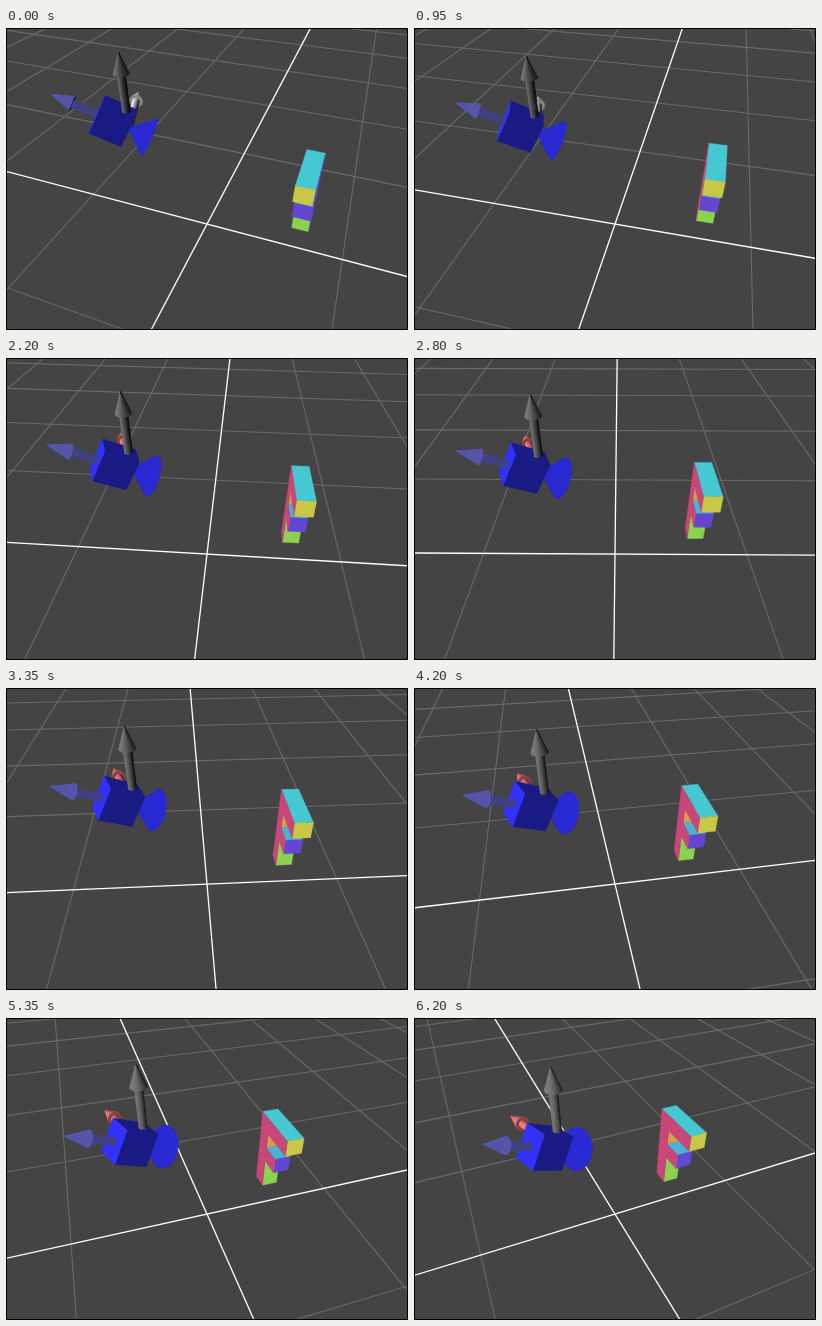
These frames come from a looping animation (402x302 px, 6250 ms). An HTML page with a canvas:

```html
<!DOCTYPE html>
<html>
<head>
<meta charset="utf-8">
<style>
  html, body { margin: 0; width: 100%; height: 100%; overflow: hidden; background: #000; }
  canvas { display: block; }
</style>
</head>
<body>
<canvas id="stage" width="402" height="302"></canvas>
<script>
const ctx = document.getElementById('stage').getContext('2d');
const LOOP = 6250, STEP = 50;
const rad = deg => deg * Math.PI / 180;

// small vector helpers
const add = (a, b, s = 1) => a.map((v, i) => v + b[i] * s);
const dot = (a, b) => a[0] * b[0] + a[1] * b[1] + a[2] * b[2];
const unit = a => { const n = Math.hypot(...a); return a.map(v => v / n); };
const cross = (a, b) => [
  a[1] * b[2] - a[2] * b[1],
  a[2] * b[0] - a[0] * b[2],
  a[0] * b[1] - a[1] * b[0]
];

// orbiting viewer: one unit is one grid cell, angle is set per frame
const FOCAL = 412, CENTER = [201, 151];
const SIN_P = Math.sin(rad(38.2)), COS_P = Math.cos(rad(38.2));
const EYE_DIST = 2.246, EYE_HEIGHT = 2.203;
let sinA, cosA, eye;

function setView(angle) {
  sinA = Math.sin(angle);
  cosA = Math.cos(angle);
  eye = [-EYE_DIST * sinA, EYE_HEIGHT, EYE_DIST * cosA];
}

function toView([x, y, z]) {
  const right = x * cosA + z * sinA;
  const ahead = x * sinA - z * cosA + EYE_DIST;
  const rise = y - EYE_HEIGHT;
  return [right, ahead * SIN_P + rise * COS_P, ahead * COS_P - rise * SIN_P];
}

const toScreen = ([x, y, z]) => [CENTER[0] + FOCAL * x / z, CENTER[1] - FOCAL * y / z];

// ground grid
const GRID = 10, NEAR = 0.2;

function line(from, to, color, width) {
  let a = toView(from), b = toView(to);
  if (a[2] < NEAR && b[2] < NEAR) return;
  const cut = (p, q) => add(p, add(q, p, -1), (NEAR - p[2]) / (q[2] - p[2]));
  if (a[2] < NEAR) a = cut(a, b);
  else if (b[2] < NEAR) b = cut(b, a);
  ctx.strokeStyle = color;
  ctx.lineWidth = width;
  ctx.beginPath();
  ctx.moveTo(...toScreen(a));
  ctx.lineTo(...toScreen(b));
  ctx.stroke();
}

function drawGrid() {
  const pair = (i, color, width) => {
    line([i, 0, -GRID], [i, 0, GRID], color, width);
    line([-GRID, 0, i], [GRID, 0, i], color, width);
  };
  for (let i = -GRID; i <= GRID; i++) if (i) pair(i, '#696969', 1.1);
  pair(0, '#fff', 1.3);
}

// flat faces, skipped when turned away from the viewer
function face(points, normal, color) {
  if (dot(normal, add(eye, points[0], -1)) <= 0) return;
  ctx.fillStyle = ctx.strokeStyle = `rgb(${color.map(Math.round)})`;
  ctx.lineWidth = 0.4;
  ctx.beginPath();
  points.forEach(p => ctx.lineTo(...toScreen(toView(p))));
  ctx.closePath();
  ctx.fill();
  ctx.stroke();
}

// letter F, standing with its arms along z
const F = { x: 0.6, y: -0.116, z: -0.44, unit: 0.0044, depth: 30 };
const fPoint = (u, v, d) => [F.x + d * F.unit, F.y + v * F.unit, F.z + u * F.unit];

function drawLetter() {
  const D = F.depth;
  const end = (u, v0, v1, color) => face(
    [fPoint(u, v0, 0), fPoint(u, v0, D), fPoint(u, v1, D), fPoint(u, v1, 0)], [0, 0, 1], color);
  const top = (v, u0, u1, color) => face(
    [fPoint(u0, v, 0), fPoint(u0, v, D), fPoint(u1, v, D), fPoint(u1, v, 0)], [0, 1, 0], color);
  const outline = [[0, 0], [30, 0], [30, 60], [67, 60], [67, 90],
    [30, 90], [30, 120], [100, 120], [100, 150], [0, 150]];
  end(30, 0, 60, [140, 210, 80]);
  end(30, 90, 120, [210, 160, 70]);
  top(90, 30, 67, [70, 180, 210]);
  end(67, 60, 90, [100, 70, 210]);
  top(150, 0, 100, [70, 200, 210]);
  end(100, 120, 150, [200, 200, 70]);
  face(outline.map(([u, v]) => fPoint(u, v, 0)), [-1, 0, 0], [200, 70, 120]);
  face(outline.map(([u, v]) => fPoint(u, v, D)), [1, 0, 0], [80, 70, 200]);
}

// camera model and its axes
const ORIGIN = [-0.434, 0.877, 0.219];
const Z_AXIS = unit(add(ORIGIN, [0.665, 0.235, -0.2], -1));
const X_AXIS = unit(cross([0, 1, 0], Z_AXIS));
const Y_AXIS = cross(Z_AXIS, X_AXIS);
const UP = [0, 1, 0], SIDE = X_AXIS.map(v => -v);
const BODY = { x: 0.075, y: 0.1, z: 0.205 };
const LENS = { radius: 0.127, length: 0.136 };
const ARROW = { length: 0.481, head: 0.125, headRadius: 0.045, radius: 0.022 };
const SEGMENTS = 24;

const shade = (color, normal) => color.map(c => c * (0.52 + 0.48 * dot(normal, Z_AXIS)));
const local = (x, y, z) => add(add(add(ORIGIN, X_AXIS, x), Y_AXIS, y), Z_AXIS, z);

// tapered tube around an axis, from radius r0 to r1
function tube(base, axis, length, r0, r1, color) {
  const p = unit(cross(axis, Math.abs(axis[1]) > 0.9 ? [1, 0, 0] : UP));
  const q = cross(axis, p);
  const end = add(base, axis, length);
  const around = k => {
    const a = k / SEGMENTS * 2 * Math.PI;
    return add(p.map(v => v * Math.cos(a)), q, Math.sin(a));
  };
  for (let k = 0; k < SEGMENTS; k++) {
    const d0 = around(k), d1 = around(k + 1);
    const normal = unit(add(around(k + 0.5), axis, (r0 - r1) / length));
    const start = r0 ? add(base, d0, r0) : add(end, d0, r1);
    face([start, add(base, d1, r0), add(end, d1, r1), add(end, d0, r1)], normal, shade(color, normal));
  }
  const back = axis.map(v => -v);
  const rim = Array.from({ length: SEGMENTS }, (_, k) => add(base, around(k), r0));
  if (r0 > r1) face(rim, back, shade(color, back));
}

function arrow(axis, start, color) {
  const neck = ARROW.length - ARROW.head;
  const neckPoint = add(ORIGIN, axis, neck);
  const shaft = () => tube(add(ORIGIN, axis, start), axis, neck - start, ARROW.radius, ARROW.radius, color);
  const head = () => tube(neckPoint, axis, ARROW.head, ARROW.headRadius, 0, color);
  const towardViewer = dot(axis, add(eye, neckPoint, -1)) > 0;
  (towardViewer ? [shaft, head] : [head, shaft]).forEach(draw => draw());
}

function drawBody() {
  const { x, y, z } = BODY, blue = [50, 50, 255];
  const side = (normal, ...corners) => face(corners.map(c => local(...c)), normal, shade(blue, normal));
  side(Y_AXIS, [-x, y, 0], [x, y, 0], [x, y, z], [-x, y, z]);
  side(X_AXIS, [x, -y, 0], [x, y, 0], [x, y, z], [x, -y, z]);
  side(Z_AXIS, [-x, -y, z], [x, -y, z], [x, y, z], [-x, y, z]);
}

function drawCamera(sideColor) {
  arrow(SIDE, 0, sideColor);
  tube(ORIGIN, Z_AXIS.map(v => -v), LENS.length, 0, LENS.radius, [48, 48, 255]);
  drawBody();
  arrow(Z_AXIS, BODY.z, [128, 128, 255]);
  arrow(UP, BODY.y / Y_AXIS[1], [128, 128, 128]);
}

const TURN_RED = 1550, PAUSE = 4400;

function draw(time) {
  const held = time >= PAUSE ? STEP : 0;
  setView(rad(-20.41 + 7.13 * (time - held) / 1000));
  ctx.fillStyle = '#000';
  ctx.fillRect(0, 0, 402, 302);
  ctx.save();
  ctx.beginPath();
  ctx.rect(1, 1, 400, 300);
  ctx.clip();
  ctx.fillStyle = '#444';
  ctx.fillRect(1, 1, 400, 300);
  drawGrid();
  drawLetter();
  drawCamera(time < TURN_RED ? [255, 255, 255] : [255, 128, 128]);
  ctx.restore();
}

function tick() {
  const time = performance.now() % LOOP;
  draw(Math.floor(time / STEP) * STEP);
  requestAnimationFrame(tick);
}
tick();
</script>
</body>
</html>
```
